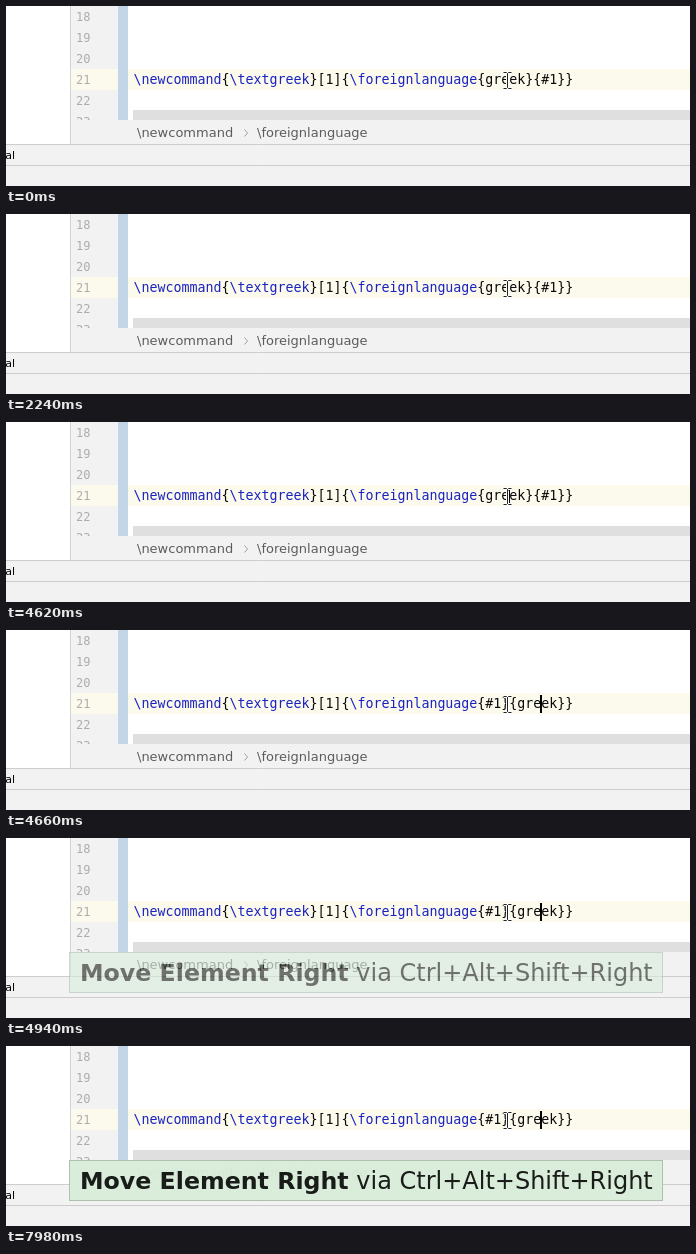
Write an HTML page that moves like this. It is 684 px wide and 180 px high and loops after 8 s.

```html
<!DOCTYPE html>
<html lang="en">
<head>
<meta charset="utf-8">
<title>Move element right</title>
<style>
  html, body { margin: 0; width: 100%; height: 100%; overflow: hidden; background: #f2f2f2; }
  svg { display: block; }
  text { white-space: pre; font-family: "DejaVu Sans", sans-serif; }
  #code { font: 13.29px "DejaVu Sans Mono", monospace; fill: #0a0a0a; }
  #code .cmd { fill: #1a22c0; }
  #lines text { font: 12px "DejaVu Sans Mono", monospace; fill: #adadad; }
  .crumb { font-size: 13px; fill: #5c5c5c; }
  #popup text { font-size: 24px; fill: #121612; }
  #popup .action { font-size: 23.7px; font-weight: bold; }
</style>
</head>
<body>
<svg width="684" height="180" viewBox="0 0 684 180">
  <defs>
    <path id="beam" d="M497.500 66.500h3l1 1l1 -1h3M501.500 67.500V81.500M497.500 82.500h3l1 -1l1 1h3"/>
  </defs>
  <rect width="684" height="180" fill="#f2f2f2"/>
  <rect width="64" height="138" fill="#fff"/>
  <rect x="64" width="1" height="138" fill="#d4d4d4"/>
  <rect x="122" width="562" height="114" fill="#fff"/>
  <rect x="65" y="63" width="619" height="21" fill="#fcfaed"/>
  <rect x="112" width="10" height="114" fill="#c3d6e8"/>
  <rect x="127" y="104" width="557" height="10" fill="#dfdfdf"/>
  <g id="lines"></g>
  <text id="code" x="127.500" y="78"><tspan class="cmd">\newcommand</tspan>{<tspan class="cmd">\textgreek</tspan>}[1]{<tspan class="cmd">\foreignlanguage</tspan><tspan id="args"></tspan>}</text>

  <rect x="65" y="114" width="619" height="24" fill="#f2f2f2"/>
  <text class="crumb" x="131" y="131">\newcommand</text>
  <path d="M238.500 123.500l3 3.500l-3 3.500" fill="none" stroke="#a0a0a0"/>
  <text class="crumb" x="251" y="131">\foreignlanguage</text>
  <path d="M0 138.500H684M0 159.500H684" stroke="#cdcdcd"/>
  <text x="9" y="153" font-size="11" text-anchor="end">al</text>

  <rect id="caret" y="65" width="2" height="18"/>
  <g fill="none">
    <use href="#beam" stroke="#fff" stroke-width="3"/>
    <use href="#beam" stroke="#222"/>
  </g>

  <g id="popup">
    <rect x="63.500" y="114.500" width="593" height="40" fill="#d9edda" stroke="#abc0ac"/>
    <text class="action" x="74" y="143">Move Element Right</text>
    <text x="350.300" y="143">via Ctrl+Alt+Shift+Right</text>
  </g>
</svg>
<script>
  const DURATION = 8000, CARET_ON = 4500, SWAP = 4660, FADE_START = 4780, FADE = 440;
  const byId = id => document.getElementById(id);
  const [args, caret, popup] = ['args', 'caret', 'popup'].map(byId);

  for (let n = 18; n <= 23; n++) {
    byId('lines').innerHTML += `<text x="70" y="${15 + (n - 18) * 21}">${n}</text>`;
  }

  function draw(time) {
    const swapped = time >= SWAP;
    args.textContent = swapped ? '{#1}{greek}' : '{greek}{#1}';
    caret.setAttribute('x', swapped ? 534 : 502);
    caret.style.opacity = time >= CARET_ON ? 1 : 0;
    const p = Math.min(1, Math.max(0, (time - FADE_START) / FADE));
    popup.style.opacity = 0.97 * (1 - (1 - p) ** 2);
  }

  function tick() {
    draw(performance.now() % DURATION);
    requestAnimationFrame(tick);
  }
  tick();
</script>
</body>
</html>
```
